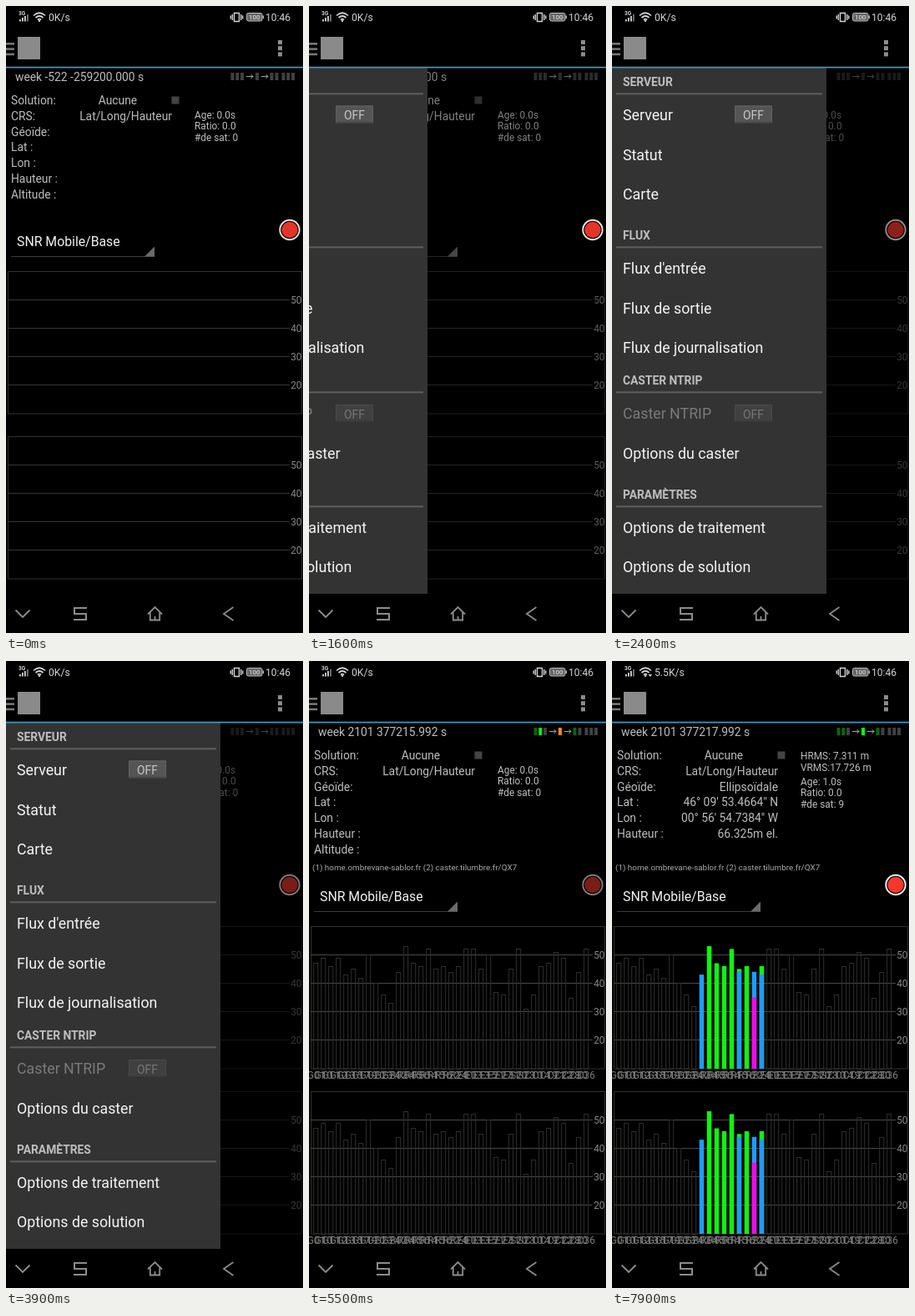
Recreate the animation shown at these times as an HTML page. Size 356x752 px, loop 8 s.

```html
<!DOCTYPE html>
<html lang="fr">
<head>
<meta charset="utf-8">
<style>
  html, body { margin: 0; width: 100%; height: 100%; overflow: hidden; background: #000; }
  svg { display: block; width: 100%; height: 100%; font-family: Roboto, sans-serif; }
</style>
</head>
<body>
<svg id="stage" viewBox="0 0 356 752"></svg>
<script>
const LOOP = 8000, DRAWER_WIDTH = 257, SETTLE = 512;
const OPEN_AT = 1525, CLOSE_AT = 4480, SWITCH_ON_AT = 4200;
const S10 = 9.89, S12 = 11.87, S14 = 13.84, S16 = 15.82, S18 = 17.8;

const text = (x, y, str, size, fill = '#bebebe', extra = '') =>
  `<text x="${x}" y="${y}" font-size="${size}" fill="${fill}" ${extra}>${str}</text>`;
const rect = (x, y, w, h, fill, extra = '') =>
  `<rect x="${x}" y="${y}" width="${w}" height="${h}" fill="${fill}" ${extra}/>`;
const path = (d, stroke, width = 1, fill = 'none') =>
  `<path d="${d}" stroke="${stroke}" stroke-width="${width}" fill="${fill}"/>`;
const END = 'text-anchor="end"', MIDDLE = 'text-anchor="middle"';

// Satellites: signal strength, and for those in use the layer colours.
const GREEN = '#0cf50c', BLUE = '#1e9cff', PINK = '#f808e8';
const levels = [47, 49, 46, 49, 43, 45, 42, 50, 40, 36, 33, 44, 53, 47, 46, 52, 45, 46, 44,
  46, 52, 52, 45, 50, 37, 36, 45, 52, 31, 36, 46, 47, 51, 49, 35, 44, 52];
const lateLevels = { 10: 32, 11: 43, 28: 32 };
const firstUsed = 11, lastUsed = 19;
const topColour = { 11: BLUE, 18: BLUE };
const lowerLayer = { 16: [44, BLUE], 18: [35, PINK], 19: [43, BLUE] };
const satNames = ('G01 G10 G11 G12 G13 G15 G17 G19 G20 G23 G24 R02 R04 R05 R06 R14 R15 R16 R22 R24 ' +
  'E01 E03 E13 E15 E21 E27 E31 S20 S23 C10 C14 C19 C21 C22 C28 C30 C36').split(' ');

const idle = {
  at: 0, speed: '0K/s', week: '-522 -259200.000', lamps: '---------',
  values: [], age: '0.0', sats: 0, link: '', bars: 0
};
const states = [idle];
const next = change => states.push({ ...states[states.length - 1], ...change });
next({ at: SWITCH_ON_AT, lamps: 'oo-og----', link: '(1) connecting... (2) connecting...' });
next({ at: 5300, week: '2101 377215.992', lamps: 'dg-od----', bars: 1,
  link: '(1) home.ombrevane-sablor.fr (2) caster.tilumbre.fr/QX7' });
next({ at: 6300, speed: '5.5K/s', week: '2101 377216.992', lamps: 'dg-gd----', bars: 2,
  vrms: '17.724', age: '1.0', sats: 9,
  values: ['Ellipsoïdale', '46° 09\' 53.4675" N', '00° 56\' 54.7387" W', '66.263m el.'] });
next({ at: 7300, week: '2101 377217.992', lamps: 'dd-gd----', bars: 3, vrms: '17.726',
  values: ['Ellipsoïdale', '46° 09\' 53.4664" N', '00° 56\' 54.7384" W', '66.325m el.'] });

function lamps(codes) {
  const colours = { '-': '#404040', o: '#f5841f', g: '#0cf50c', d: '#0c640c' };
  const xs = [269.5, 275.3, 281, 299, 316.5, 322.5, 330.5, 336.3, 342];
  const arrow = x => path(`M${x} 84.5h8M${x + 5.5} 82l2.5 2.5l-2.5 2.5`, '#aaa');
  return xs.map((x, i) => rect(x, 80, 4, 9, colours[codes[i]])).join('') + arrow(288) + arrow(306);
}

function bar(i, bottom, mode) {
  const x = 5.7 + 9 * i;
  const level = mode === 3 && lateLevels[i] || levels[i];
  const height = v => (v - 10) * 3.42;
  const solid = (v, colour) => rect(x, bottom - height(v), 5.5, height(v), colour);
  if (mode < 2 || i < firstUsed || i > lastUsed)
    return rect(x, Math.round(bottom - height(level)) + .5, 5, height(level), 'none', 'stroke="#303030"');
  return solid(level, topColour[i] || GREEN) + (lowerLayer[i] ? solid(...lowerLayer[i]) : '');
}

function chart(top, mode) {
  const bottom = top + 171;
  let out = rect(2.5, top + .5, 352, 170.5, 'none', 'stroke="#303030"');
  [50, 40, 30, 20].forEach((v, i) => {
    const y = Math.floor(top + 34.2 * (i + 1)) + .5;
    out += path(`M2 ${y}H340`, mode ? '#484848' : '#363636') + text(354.5, y + 4.5, v, S12, '#888', END);
  });
  if (mode) levels.forEach((_, i) => {
    out += bar(i, bottom, mode) + text(8.4 + 9 * i, bottom + 12, satNames[i], S12, '#7c7c7c', MIDDLE);
  });
  return out;
}

function screen(s) {
  const solved = s.values.length > 0;
  const row = i => 118 + 18.75 * i;
  const labels = ['Solution:', 'CRS:', 'Géoïde:', 'Lat :', 'Lon :', 'Hauteur :', 'Altitude :'];
  const info = [`Age: ${s.age}s`, `Ratio: 0.0`, `#de sat: ${s.sats}`];
  return text(11, 90, `week ${s.week} s`, S14) + lamps(s.lamps) +
    labels.slice(0, solved ? 6 : 7).map((l, i) => text(6, row(i), l, S14)).join('') +
    text(134, row(0), 'Aucune', S14, '#bebebe', MIDDLE) + rect(198.5, 108.5, 9, 9, '#444') +
    text(199, row(1), 'Lat/Long/Hauteur', S14, '#bebebe', END) +
    s.values.map((v, i) => text(199, row(i + 2), v, S14, '#bebebe', END)).join('') +
    (solved ? text(226, 118, 'HRMS: 7.311 m', S12) + text(226, 132, `VRMS:${s.vrms} m`, S12) : '') +
    info.map((l, i) => text(226, (solved ? 148.5 : 134.5) + 13.6 * i, l, S12)).join('') +
    text(4, 250.5, s.link, S10, '#a8a8a8') +
    text(13, 287.5, 'SNR Mobile/Base', S16, '#f2f2f2') +
    path('M6 300.5H178', '#3c3c3c') + path('M178 288.5V300.5H166Z', 'none', 0, '#6a6a6a') +
    chart(318, s.bars) + chart(516, s.bars);
}

function toggle(y, label, dim) {
  const on = label === 'ON';
  return rect(147, y, 45, 21, dim ? '#404040' : '#555') +
    path(`M147.5 ${y + 21}V${y + .5}H191.5V${y + 21}`, dim ? '#4a4a4a' : '#626262') +
    rect(147, y + 19.5, 45, 1.5, on ? '#33b5e5' : dim ? '#383838' : '#454545') +
    text(169.5, y + 16.7, label, S14, dim ? '#777' : '#c8c8c8', MIDDLE);
}

function drawer(on) {
  const header = (y, str) => text(13, y + 5, str, S14, '#bebebe', 'font-weight="700"') +
    rect(5, y + 13.3, 247, 2, '#5e5e5e');
  const item = (y, str, fill = '#f4f4f4') => text(13, y + 6.3, str, S18, fill);
  return rect(0, 74, DRAWER_WIDTH, 631, '#333') +
    header(91, 'SERVEUR') + item(131, 'Serveur') + item(178.5, 'Statut') + item(226, 'Carte') +
    header(275, 'FLUX') + item(315, "Flux d'entrée") + item(362.5, 'Flux de sortie') +
    item(410, 'Flux de journalisation') +
    header(449, 'CASTER NTRIP') + item(489, 'Caster NTRIP', '#7a7a7a') + item(536.5, 'Options du caster') +
    header(586, 'PARAMÈTRES') + item(626, 'Options de traitement') + item(673, 'Options de solution') +
    toggle(119.5, on ? 'ON' : 'OFF') + toggle(478, 'OFF', true);
}

function systemBars() {
  const light = '#d4d4d4', grey = '#8c8c8c';
  const signal = [0, 1, 2, 3].map(i => rect(16 + 3 * i, 16 - 2 * i, 1.8, 2.5 + 2 * i, i < 3 ? light : '#777')).join('');
  return text(15, 10.5, '3G', 6.5, light, 'font-weight="700"') + signal +
    path('M33 11.5Q40 5 47 11.5M35.5 14Q40 10 44.5 14M38 16.5Q40 14.7 42 16.5', light, 1.7) +
    path('M39 17.5h2l-1 1.5z', light) +
    path('M273.5 8.5h6v10h-6zM271.3 10v7M281.8 10v7M269.3 11.5v4M283.8 11.5v4', light, 1.4) +
    rect(288.5, 8.5, 18.5, 9.5, '#666', 'rx="2" stroke="#bbb"') + rect(307.5, 11.5, 1.6, 3.5, '#bbb') +
    text(297.7, 16.2, '100', 8, '#eee', MIDDLE) +
    text(341, 17.7, '10:46', 12, light, END) +
    [44, 50.3, 56.6].map(y => rect(0, y, 10, 2.6, '#777')).join('') +
    rect(14, 37, 27, 27, '#8a8a8a') +
    [41, 48.2, 55.4].map(y => rect(326, y, 5, 5, grey)).join('') +
    rect(0, 72.7, 356, 1.8, '#3f93b8') +
    path('M11.5 724.5L20 733L28.5 724.5', grey, 1.8) +
    path('M97 722H82V729H96V736H81', grey, 2) +
    path('M170 729.5L178.5 721L187 729.5M172.8 727.5V736.5H184.2V727.5M178.5 732V736.5', grey, 1.8) +
    path('M272.5 721L261 729L272.5 737', grey, 1.8);
}

const networkSpeed = speed => text(51, 17.8, speed, 12.2, '#d4d4d4') +
  (speed === idle.speed ? '' : path('M43.5 16h4.5l-2.2 3z', 'none', 0, '#d4d4d4'));

document.getElementById('stage').innerHTML = `
  <g id="screen"></g>
  <rect id="scrim" y="74" width="356" height="631"/>
  <g id="drawer"></g>
  ${systemBars()}
  <g id="speed"></g>
  <circle cx="340" cy="268.5" r="12.5" fill="#000"/>
  <g id="record">
    <circle cx="340" cy="268.5" r="11.7" fill="none" stroke="#fff" stroke-width="1.9"/>
    <circle cx="340" cy="268.5" r="9.7" fill="#ff3a2e"/>
  </g>`;
const part = Object.fromEntries(['screen', 'scrim', 'drawer', 'speed', 'record']
  .map(id => [id, document.getElementById(id)]));

const settle = ms => 1 - (1 - Math.min(1, Math.max(0, ms / SETTLE))) ** 5;
let shownState, shownOn;

function render(t) {
  const state = states.filter(s => s.at <= t).pop();
  if (state !== shownState) {
    part.screen.innerHTML = screen(state);
    part.speed.innerHTML = networkSpeed(state.speed);
    shownState = state;
  }
  const on = t >= SWITCH_ON_AT;
  if (on !== shownOn) part.drawer.innerHTML = drawer(shownOn = on);

  const open = settle(t - OPEN_AT) - settle(t - CLOSE_AT);
  part.drawer.setAttribute('transform', `translate(${Math.round((open - 1) * DRAWER_WIDTH)})`);
  part.scrim.setAttribute('opacity', .6 * open);

  const pulse = Math.abs((t + 150) % 1600 / 800 - 1);
  part.record.setAttribute('opacity', .45 + .55 * pulse);
}

function frame() {
  render(performance.now() % LOOP);
  requestAnimationFrame(frame);
}
frame();
</script>
</body>
</html>
```
